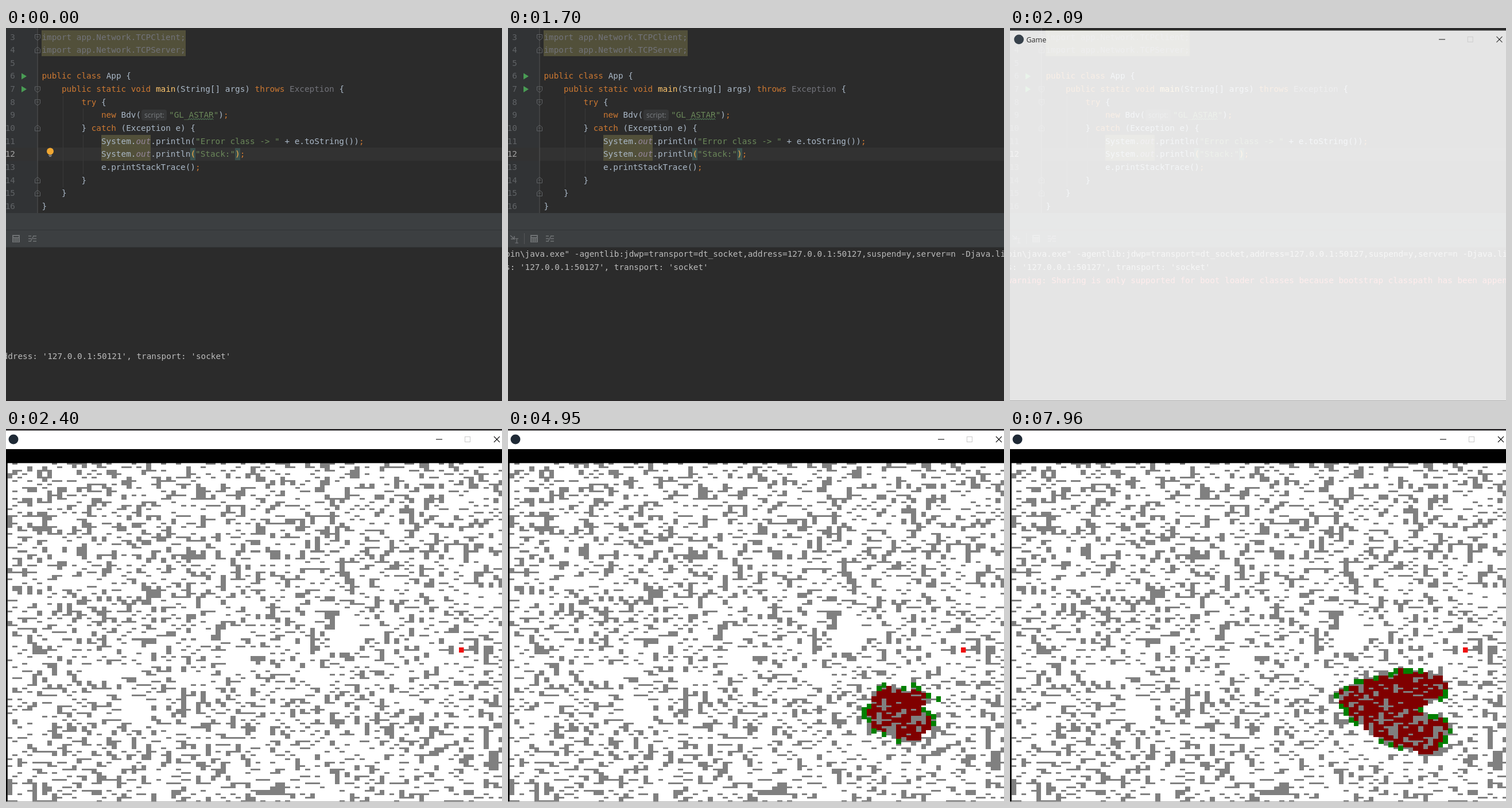
Recreate the animation shown at these times as an HTML page with a canvas. Size 864 px wide and 649 px high, loop 8000 ms.

```html
<!DOCTYPE html>
<html lang="en">
<head>
<meta charset="utf-8">
<title>Path search</title>
<style>
html, body { margin: 0; width: 100%; height: 100%; overflow: hidden; background: #2b2b2b; }
canvas { display: block; }
</style>
</head>
<body>
<canvas id="stage" width="864" height="649"></canvas>
<script>
const W = 864, H = 649, LOOP = 8000;
const ctx = document.getElementById('stage').getContext('2d');
const MONO = '"DejaVu Sans Mono", monospace';
const SANS = '"Open Sans", sans-serif';
const CODE = '14.34px ' + MONO;
const ADV = 8.633, PITCH = 22.65;
const KEY = '#cc7832', TXT = '#a9b7c6', STR = '#6a8759', DIM = '#72737a', OUT = '#94869a', PAREN = '#f9b04a';

function box(g, color, x, y, w, h) {
  g.fillStyle = color;
  g.fillRect(x, y, w, h);
}

function text(str, x, y, color, font = CODE, align = 'left') {
  ctx.font = font;
  ctx.textAlign = align;
  ctx.fillStyle = color;
  ctx.fillText(str, x, y);
}

function stroke(color, width, ...pts) {
  ctx.strokeStyle = color;
  ctx.lineWidth = width;
  ctx.beginPath();
  pts.forEach(([x, y], i) => i ? ctx.lineTo(x, y) : ctx.moveTo(x, y));
  ctx.stroke();
}

function dot(color, x, y, r) {
  ctx.fillStyle = color;
  ctx.beginPath();
  ctx.arc(x, y, r, 0, 7);
  ctx.fill();
}

// ---- editor ----
const colX = col => 62.4 + col * ADV;
const baseY = line => 20.5 + (line - 3) * PITCH;

// parts: color, text, color, text...
function code(line, col, ...parts) {
  for (let i = 0; i < parts.length; i += 2) {
    const italic = parts[i] === OUT ? 'italic ' : '';
    text(parts[i + 1], colX(col), baseY(line), parts[i], italic + CODE);
    col += parts[i + 1].length;
  }
}

function fold(line, up) {
  const y = baseY(line) - 4.5, d = up ? -1 : 1;
  ctx.fillStyle = '#313335';
  stroke('#606366', 1, [50.5, y - 4.5 * d], [59.5, y - 4.5 * d], [59.5, y + 2 * d],
    [55, y + 5.5 * d], [50.5, y + 2 * d], [50.5, y - 4.5 * d]);
  stroke('#606366', 1, [53, y - 0.5], [57, y - 0.5]);
}

function arrow(line) {
  const y = baseY(line) - 4.5;
  ctx.fillStyle = '#499c54';
  ctx.beginPath();
  ctx.moveTo(27, y - 5.5);
  ctx.lineTo(36, y);
  ctx.lineTo(27, y + 5.5);
  ctx.fill();
}

function editor(t) {
  box(ctx, '#2b2b2b', 0, 0, W, 322);
  box(ctx, '#313335', 0, 0, 55, 322);
  box(ctx, '#323232', 0, 208, W, 23);
  box(ctx, '#555555', 54.5, 0, 1, 322);
  box(ctx, '#52503a', 62, 4, 251, 45);
  box(ctx, '#52503a', 166, 186, 86, 45);
  box(ctx, '#393939', 99, 118, 1, 159);
  box(ctx, '#393939', 134, 140, 1, 23);
  box(ctx, '#393939', 134, 186, 1, 68);
  box(ctx, '#3b514d', 321, 209, 9, 21);
  box(ctx, '#3b514d', 399, 209, 9, 21);

  for (let n = 3; n <= 16; n++)
    text(n, 16, baseY(n), n === 12 ? '#a4a3a3' : '#606366', CODE, 'right');
  [3, 7, 8].forEach(n => fold(n, false));
  [4, 10, 14, 15].forEach(n => fold(n, true));
  arrow(6);
  arrow(7);

  code(3, 0, DIM, 'import app.Network.TCPClient;');
  code(4, 0, DIM, 'import app.Network.TCPServer;');
  code(6, 0, KEY, 'public class ', TXT, 'App {');
  code(7, 4, KEY, 'public static void ', '#ffc66d', 'main', TXT, '(String[] args) ',
    KEY, 'throws ', DIM, 'Exception ', TXT, '{');
  code(8, 8, KEY, 'try ', TXT, '{');
  code(9, 12, KEY, 'new ', TXT, 'Bdv(');
  ctx.fillStyle = '#363738';
  ctx.beginPath();
  ctx.roundRect(236, 142, 44, 19, 4);
  ctx.fill();
  text('script:', 241, 156, '#7b7f83', '12.2px ' + SANS);
  code(9, 25.67, STR, '"GL_ASTAR"', TXT, ')', KEY, ';');
  const wave = [];
  for (let x = 317; x <= 361; x += 2) wave.push([x, x % 4 === 1 ? 159.5 : 157.5]);
  stroke('#659c6b', 1, ...wave);
  code(10, 8, TXT, '} ', KEY, 'catch ', TXT, '(Exception e) {');
  code(11, 12, TXT, 'System.', OUT, 'out', TXT, '.println(', STR, '"Error class -> "',
    TXT, ' + e.toString())', KEY, ';');
  code(12, 12, TXT, 'System.', OUT, 'out', TXT, '.println', PAREN, '(', STR, '"Stack:"',
    PAREN, ')', KEY, ';');
  code(13, 12, TXT, 'e.printStackTrace()', KEY, ';');
  code(14, 8, TXT, '}');
  code(15, 4, TXT, '}');
  code(16, 0, TXT, '}');

  if (t < 1160) {
    dot('#f0a732', 77, 214.5, 6);
    box(ctx, '#f0a732', 74, 217, 6, 3);
    box(ctx, '#a9a9a9', 74, 221, 6, 1);
    box(ctx, '#a9a9a9', 75, 223, 4, 1);
  }
  if (t >= 1010 && t < 1540) box(ctx, '#dddddd', 329, 210, 2, 19);
}

// ---- tool panel and console ----
const ICON = '#6e7173';

function gridIcon(x) {
  box(ctx, ICON, x - 7, 360, 13, 13);
  box(ctx, '#3c3f41', x - 5, 362, 9, 2);
  for (let i = 0; i < 9; i++)
    box(ctx, '#3c3f41', x - 5 + i % 3 * 3.5, 366 + Math.floor(i / 3) * 2.3, 2, 1.3);
}

function linesIcon(x) {
  [362, 366.5, 371].forEach(y => {
    stroke(ICON, 1.6, [x - 7, y], [x - 2, y]);
    stroke(ICON, 1.6, [x + 1, y], [x + 7, y]);
  });
  stroke(ICON, 1.4, [x - 3, 371], [x + 2, 362]);
}

function panel(t) {
  box(ctx, '#3c3f41', 0, 322, W, 60);
  box(ctx, '#313335', 0, 351, W, 1);
  const running = t >= 1310;
  gridIcon(running ? 46 : 18);
  linesIcon(running ? 73 : 46);
  if (running) {
    box(ctx, '#555759', 28, 357, 1, 19);
    stroke(ICON, 1.6, [4, 361], [11, 367], [11, 362]);
    stroke(ICON, 1.6, [11, 367], [5, 367]);
    stroke(ICON, 1.2, [12.5, 366.5], [18, 366.5]);
    stroke(ICON, 1.2, [15.3, 366.5], [15.3, 374]);
    stroke(ICON, 1.2, [12.5, 374], [18, 374]);
  }

  const starting = running && t < 1390;
  box(ctx, starting ? '#3c3f41' : '#2b2b2b', 0, 382, W, 267);
  box(ctx, '#323537', 0, 381, W, 1);
  if (starting) box(ctx, '#323537', 0, 411, W, 1);
  if (!running) {
    text("ddress: '127.0.0.1:50121', transport: 'socket'", -5.5, 575.5, '#bbbbbb');
    if (t >= 70 && t < 150) {
      box(ctx, '#cccccc', 776, 626, 6, 1);
      box(ctx, '#cccccc', 778.5, 626, 1, 14);
      box(ctx, '#cccccc', 776, 639, 6, 1);
    }
  } else if (!starting) {
    text('bin\\java.exe" -agentlib:jdwp=transport=dt_socket,address=127.0.0.1:50127,suspend=y,server=n -Djava.library',
      -5, 398, '#bbbbbb');
    if (t >= 1620) text("s: '127.0.0.1:50127', transport: 'socket'", -5, 420.6, '#bbbbbb');
    if (t >= 1780)
      text('warning: Sharing is only supported for boot loader classes because bootstrap classpath has been appended',
        -5.5, 444, '#ff6b68');
  }
  box(ctx, '#2b2528', 0, 648, W, 1);
}

// ---- game window ----
// start time, opacity, scale
const OPENING = [[1940, 0.155, 0.958], [2020, 0.55, 0.983], [2090, 0.877, 0.994], [2170, 1, 1]];

function gameWindow(t) {
  const step = OPENING.filter(s => s[0] <= t).pop();
  if (!step) return;
  const [, alpha, scale] = step;
  ctx.save();
  ctx.globalAlpha = alpha;
  ctx.translate(435, 327);
  ctx.scale(scale, scale);
  ctx.translate(-435, -327);
  box(ctx, '#ffffff', -4, 2.5, 884, 660);
  dot('#1f2a36', 13, 18, 8.5);
  if (t < 2250) text('Game', 26, 23, '#111111', '12.6px ' + SANS);
  stroke('#111111', 1.1, [749, 18], [760, 18]);
  ctx.strokeStyle = '#cccccc';
  ctx.strokeRect(799.5, 13.5, 9, 9);
  stroke('#111111', 1.1, [850, 13], [860, 23]);
  stroke('#111111', 1.1, [860, 13], [850, 23]);
  ctx.restore();
  if (scale === 1) box(ctx, '#2b282b', 0, 0, W, 2.5);
  if (t >= 2250) box(ctx, '#000000', 0, 35, W, 614);
  if (t >= 2400) {
    ctx.drawImage(maze, 0, 0);
    search(t);
    box(ctx, '#f01010', 789, 380, 8.5, 9);
  }
  if (alpha > 0.8) box(ctx, '#b0b0b0', 0, 648, W, 1);
}

// ---- maze ----
const COLS = 100, ROWS = 98, CW = 8.64, CH = 6.12, X0 = 2.5, Y0 = 55.4;
const WALLS = [[20, 60, 50, 6], [3, 248, 50, 7], [435, 628, 50, 9], [435, 165, 14, 18],
  [555, 165, 6, 26], [574, 165, 6, 30], [219, 362, 40, 8], [565, 320, 6, 28]];
const GAPS = [[385, 388, 45, 28], [210, 475, 40, 35], [130, 410, 60, 25], [573, 330, 40, 60]];

function noise(n) {
  n = Math.imul(n + 0x6d2b79f5 ^ n >>> 15, 0x2c1b3c6d);
  n = Math.imul(n ^ n >>> 12, 0x297a2d39);
  return ((n ^ n >>> 15) >>> 0) / 4294967296;
}

const midX = c => X0 + (c + 0.5) * CW;
const midY = r => Y0 + (r + 0.75) * CH;
const within = (list, x, y) => list.some(b => x >= b[0] && x <= b[0] + b[2] && y >= b[1] && y <= b[1] + b[3]);

const free = Array.from({ length: COLS * ROWS }, (_, i) => {
  const x = midX(i % COLS), y = midY(Math.floor(i / COLS));
  if (within(WALLS, x, y)) return false;
  return within(GAPS, x, y) || noise(i * 7 + 11) > 0.345;
});

// Open cells are taller than their row, so they overlap the walls below.
function cell(g, color, i) {
  const c = i % COLS, r = Math.floor(i / COLS);
  const x = Math.round(X0 + c * CW), y = Math.round(Y0 + r * CH);
  box(g, color, x, y, Math.round(X0 + (c + 1) * CW) - x, Math.round(Y0 + (r + 1.5) * CH) - y);
}

const maze = document.createElement('canvas');
maze.width = W;
maze.height = H;
const mazeCtx = maze.getContext('2d');
mazeCtx.beginPath();
mazeCtx.rect(2.5, 59.5, W, H);
mazeCtx.clip();
box(mazeCtx, '#808080', 0, 0, W, H);
free.forEach((open, i) => open && cell(mazeCtx, '#ffffff', i));

// ---- search area: grows from a point to MID, then to END ----
const START = [685, 494];
const MID = [[616, 492], [628, 474], [645, 448], [668, 441], [690, 450], [712, 441], [728, 456], [754, 468],
  [728, 482], [724, 488], [742, 500], [745, 516], [728, 536], [698, 552], [660, 538], [628, 520]];
const END = [[565, 463], [607, 436], [655, 424], [680, 416], [728, 417], [760, 434], [771, 448], [762, 466],
  [728, 478], [720, 490], [745, 502], [780, 510], [762, 545], [720, 570], [645, 546], [590, 505]];
const mix = (a, b, u) => [a[0] + (b[0] - a[0]) * u, a[1] + (b[1] - a[1]) * u];

function outline(t) {
  const path = new Path2D();
  MID.forEach((p, i) => {
    const u = Math.min(1, Math.max(0, (t - 4950) / 3000));
    const q = t < 4950
      ? mix(START, p, Math.sqrt((t - 2400) / 2550))
      : mix(p, END[i], i ? u : Math.pow(u, 0.4));
    path.lineTo(...q);
  });
  path.closePath();
  return path;
}

function search(t) {
  const tick = Math.floor((t - 2400) / 75) * 75 + 2400;
  if (tick <= 2400) return;
  const area = outline(tick), seen = new Set();
  for (let r = 56; r < 86; r++)
    for (let c = 62; c < 92; c++) {
      const i = r * COLS + c;
      if (free[i] && ctx.isPointInPath(area, midX(c), midY(r))) seen.add(i);
    }
  const edge = [];
  seen.forEach(i => {
    const open = [1, -1, COLS, -COLS].some(d => free[i + d] && !seen.has(i + d));
    if (open) edge.push(i);
    else cell(ctx, '#800000', i);
  });
  edge.forEach(i => noise(i) < 0.7 && cell(ctx, '#008000', i));
}

function draw(now) {
  const t = now % LOOP;
  if (t < 2250) {
    editor(t);
    panel(t);
  }
  gameWindow(t);
  requestAnimationFrame(draw);
}
requestAnimationFrame(draw);
</script>
</body>
</html>
```
